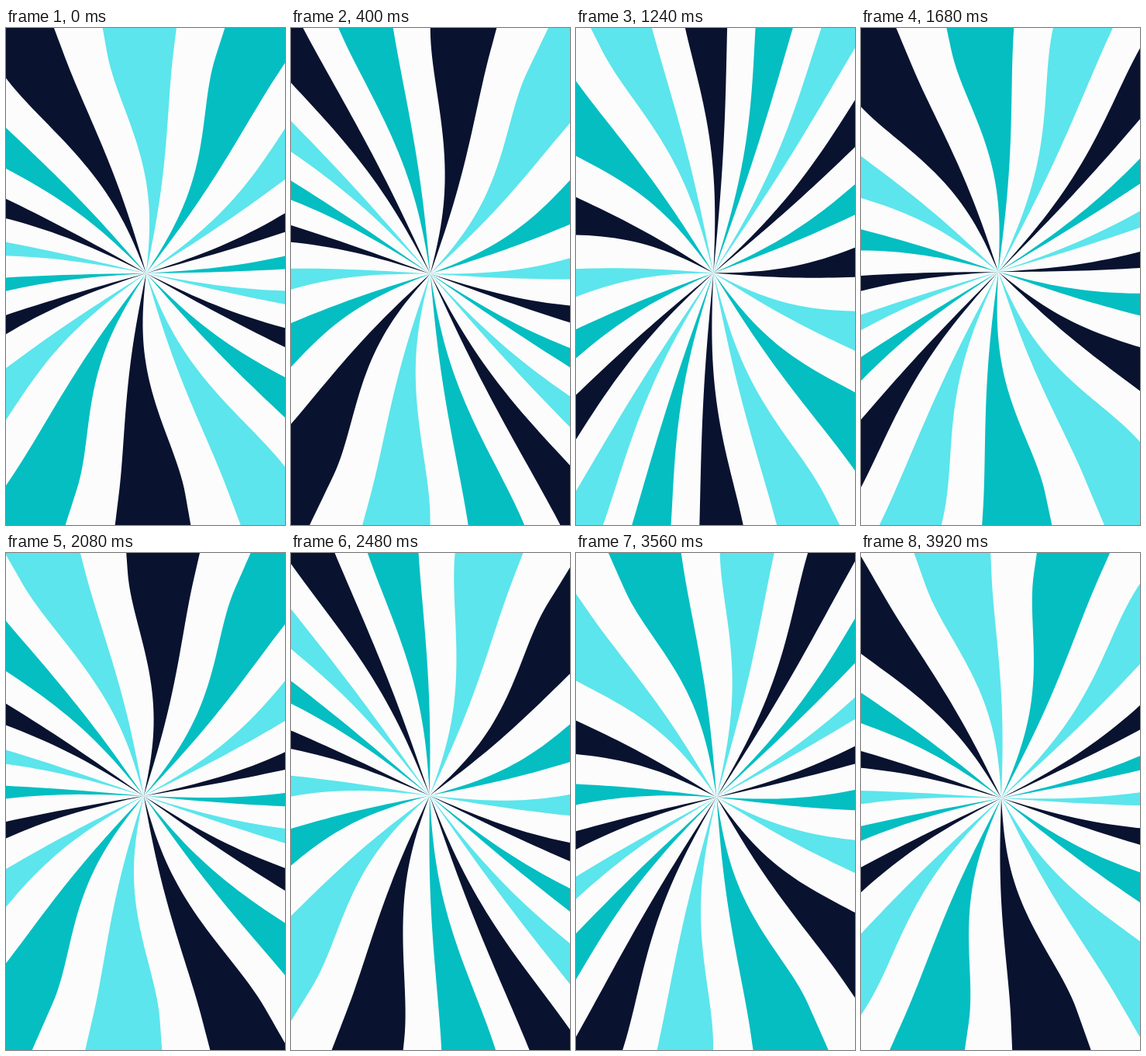
An HTML page with a canvas that plays this animation: 360 by 640 pixels, repeating every 3.96 s.

```html
<!DOCTYPE html>
<html lang="en">
<head>
<meta charset="utf-8">
<title>Sunburst</title>
<style>
html, body { margin: 0; width: 100%; height: 100%; overflow: hidden; background: #fcfcfc; }
canvas { display: block; }
</style>
</head>
<body>
<canvas id="stage" width="360" height="640"></canvas>
<script>
const ctx = document.getElementById('stage').getContext('2d');
const COLORS = { N: '#091330', L: '#5ce5ec', T: '#04bec2' };
const PAPER = '#fcfcfc';
const ORDER = 'NLT' + 'LNT'.repeat(5);

const LOOP = 3960, STEP = 40, TURN = 3.576;
const REACH = 450;        // ray length
const BEND = 340;         // radius at which the twist is complete
const STRETCH = Math.sqrt(1.41), TILT = 1;

// Each side of a ray: bearing at the hub and its twist further out, in degrees
const LEADING = { hub: -15.5, twist: -11.4 };
const TRAILING = { hub: -11.5, twist: -3.2 };

const rad = deg => deg * Math.PI / 180;

function smooth(x) {
  const t = Math.min(x, 1);
  return t * t * (3 - 2 * t);
}

function sidePoints({ hub, twist }, turn) {
  const points = [];
  for (let r = 0; r <= REACH; r += 10) {
    const a = rad(turn + hub + twist * smooth(r / BEND) - TILT);
    points.push([r * Math.sin(a), -r * Math.cos(a)]);
  }
  return points;
}

function makeRay(key, i) {
  const turn = i * 360 / ORDER.length;
  const outline = [...sidePoints(LEADING, turn), ...sidePoints(TRAILING, turn).reverse()];
  const path = new Path2D();
  for (const [x, y] of outline) path.lineTo(x, y);
  path.closePath();
  return { path, color: COLORS[key] };
}

const rays = [...ORDER].map(makeRay);

function draw(time) {
  const step = Math.floor((time % LOOP) / STEP);
  ctx.setTransform(1, 0, 0, 1, 0, 0);
  ctx.fillStyle = PAPER;
  ctx.fillRect(0, 0, 360, 640);
  ctx.translate(179.2, 314.5);
  ctx.rotate(rad(step * TURN));
  ctx.translate(1.6, 1.4); // the hub sits slightly off the axis
  ctx.rotate(rad(TILT));
  ctx.scale(STRETCH, 1 / STRETCH);
  for (const { path, color } of rays) {
    ctx.fillStyle = color;
    ctx.fill(path);
  }
}

const start = performance.now();
function tick() {
  draw(performance.now() - start);
  requestAnimationFrame(tick);
}
tick();
</script>
</body>
</html>
```
